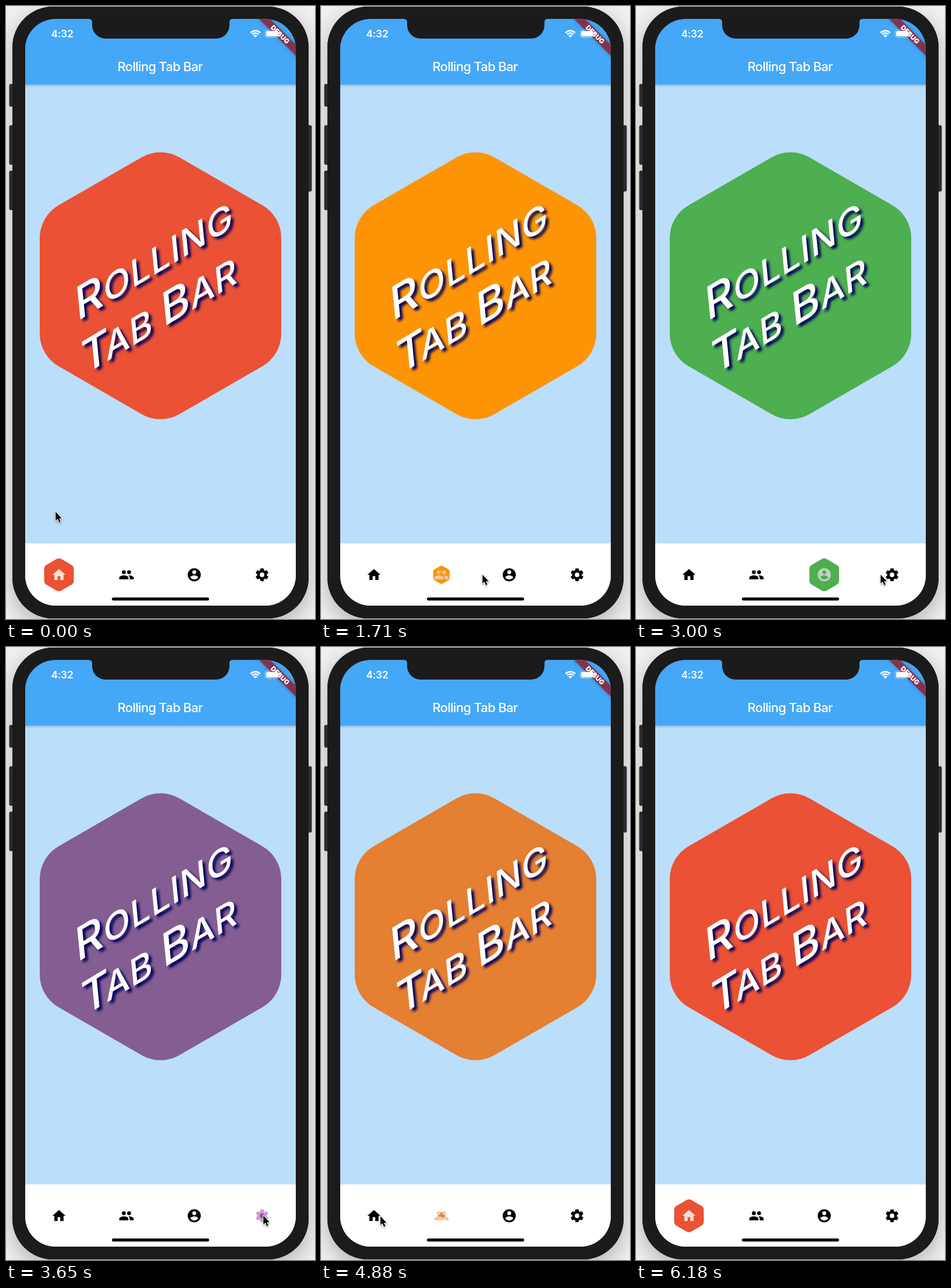
Write an HTML page with a canvas that moves like this. It is 531 by 1054 pixels and loops after 7880 ms.

```html
<!DOCTYPE html>
<html lang="en">
<head>
<meta charset="utf-8">
<title>Rolling Tab Bar</title>
<style>
html, body { margin: 0; width: 100%; height: 100%; overflow: hidden; background: #f1efef; }
canvas { display: block; }
</style>
</head>
<body>
<canvas id="stage" width="531" height="1054"></canvas>
<script>
const ctx = document.getElementById('stage').getContext('2d');
const LOOP = 7880;
const MORPH = 350;
const SANS = 'Inter, "Open Sans", sans-serif';
const TAB_Y = 978;
const ICON_SCALE = 1.123;

const tabs = [
  { x: 91, color: [235, 81, 52], active: '#fce0d0' },
  { x: 207, color: [254, 151, 4], active: '#f1c8a6' },
  { x: 323.5, color: [77, 175, 80], active: '#c6d0c8' },
  { x: 440, color: [157, 57, 177], active: '#cfa0d1' }
];

// Start of each colour change and the tab it leads to
const taps = [[0, 0], [1375, 1], [2575, 2], [3412, 3], [4622, 1], [5475, 0]];
const TAP_LEAD = 35; // the icon lights up this long before the morph

// Pointer path: time, x, y
const pointer = [
  [0, 85, 869], [150, 85, 869], [650, 106, 976], [790, 106, 976],
  [1120, 207, 976], [1450, 207, 976], [1710, 277, 977], [2000, 326, 974],
  [2210, 326, 974], [2350, 339, 982], [2700, 339, 982], [3000, 420, 977],
  [3180, 442, 977], [3700, 442, 977], [4000, 330, 1001], [4240, 188, 983],
  [4280, 185, 981], [4350, 205, 972], [4650, 205, 972], [4880, 102, 978],
  [5000, 83, 975], [6090, 83, 975], [6120, 76, 974], [6180, 76, 974]
];

const paths = {
  home: new Path2D('M10 20v-6h4v6h5v-8h3L12 3 2 12h3v8z'),
  people: new Path2D('M16 11a3 3 0 1 0 0-6a3 3 0 0 0 0 6zM8 11a3 3 0 1 0 0-6a3 3 0 0 0 0 6z' +
    'M8 13c-2.33 0-7 1.17-7 3.5V19h14v-2.5c0-2.33-4.67-3.5-7-3.5z' +
    'M16 13c-.29 0-.62.02-.97.05 1.16.84 1.97 1.97 1.97 3.45V19h6v-2.5c0-2.33-4.67-3.5-7-3.5z'),
  account: new Path2D('M12 2a10 10 0 1 0 0 20a10 10 0 0 0 0-20zM12 5a3 3 0 1 1 0 6a3 3 0 0 1 0-6z' +
    'M12 19.2c-2.5 0-4.71-1.28-6-3.22.03-1.99 4-3.08 6-3.08 1.99 0 5.97 1.09 6 3.08-1.29 1.94-3.5 3.22-6 3.22z'),
  gear: gearPath()
};
const icons = [paths.home, paths.people, paths.account, paths.gear];

const arrow = new Path2D('M0 0V15.2L3.4 12L6 18L8.5 16.9L6 11.2H10.6Z');

function gearPath() {
  const path = new Path2D();
  for (let i = 0; i < 6; i++) {
    const mid = -Math.PI / 2 + i * Math.PI / 3;
    for (const [turn, r] of [[-0.4, 7.4], [-0.23, 10.1], [0.23, 10.1], [0.4, 7.4]]) {
      path.lineTo(12 + r * Math.cos(mid + turn), 12 + r * Math.sin(mid + turn));
    }
  }
  path.closePath();
  path.moveTo(15.5, 12);
  path.arc(12, 12, 3.5, 0, Math.PI * 2);
  return path;
}

const lerp = (a, b, p) => a + (b - a) * p;
const rgb = c => `rgb(${c.map(Math.round).join(',')})`;

function box(x, y, w, h, r, fill) {
  ctx.beginPath();
  ctx.roundRect(x, y, w, h, r);
  ctx.fillStyle = fill;
  ctx.fill();
}

function label(text, x, y, font, spacing = 0) {
  ctx.font = `${font} ${SANS}`;
  ctx.letterSpacing = `${spacing}px`;
  ctx.textAlign = 'center';
  ctx.fillStyle = '#fff';
  ctx.fillText(text, x, y);
  ctx.letterSpacing = '0px';
}

function hexagon(x, y, width, fill) {
  if (width < 0.5) return;
  const half = width / 2;
  const radius = width / Math.sqrt(3);
  const corner = i => {
    const a = i * Math.PI / 3 - Math.PI / 2;
    return [x + radius * Math.cos(a), y + radius * Math.sin(a)];
  };
  ctx.beginPath();
  ctx.moveTo(x - half, y);
  for (const i of [5, 0, 1, 2, 3, 4]) {
    ctx.arcTo(...corner(i), ...corner(i + 1), width * 0.157);
  }
  ctx.closePath();
  ctx.fillStyle = fill;
  ctx.fill();
}

function tabState(t) {
  let i = taps.length - 1;
  while (i && taps[i][0] - TAP_LEAD > t) i--;
  const [start, to] = taps[i];
  const from = i ? taps[i - 1][1] : to;
  const p = i ? Math.min(1, Math.max(0, (t - start) / MORPH)) : 1;
  const color = tabs[from].color.map((c, k) => lerp(c, tabs[to].color[k], p));
  const grow = Math.max(0, 2 * p - 1);
  return {
    to,
    color: rgb(color),
    spot: p < 0.5 ? from : to,
    scale: p < 0.5 ? (1 - 2 * p) ** 2 : 0.5 * (grow + grow ** 20)
  };
}

function drawPhone() {
  ctx.fillStyle = '#f1efef';
  ctx.fillRect(0, 0, 531, 1054);
  ctx.save();
  ctx.shadowColor = 'rgba(0,0,0,.26)';
  ctx.shadowBlur = 36;
  ctx.shadowOffsetY = 12;
  box(11, 1, 509, 1052, 70, '#1b1b1b');
  ctx.restore();
  for (const [x, y, h] of [[5.5, 134, 39], [5.5, 205, 68], [5.5, 283, 68], [516, 205, 114]]) {
    box(x, y, 9.5, h, 3, '#292e35');
  }
  box(11, 1, 509, 1052, 70, '#1b1b1b');
}

function drawBanner() {
  ctx.save();
  ctx.translate(498, 22);
  ctx.rotate(Math.PI / 4);
  ctx.shadowColor = 'rgba(0,0,0,.35)';
  ctx.shadowBlur = 6;
  ctx.fillStyle = 'rgba(160,22,36,.72)';
  ctx.fillRect(-60, 31.4, 120, 13.5);
  ctx.shadowColor = 'transparent';
  label('DEBUG', 0, 42.2, '900 11.5px');
  ctx.restore();
}

function drawStatus() {
  label('4:32', 96.5, 54, '600 17.5px', -0.3);

  ctx.fillStyle = ctx.strokeStyle = '#fff';
  ctx.lineWidth = 2.6;
  for (const r of [11.8, 7.8]) {
    ctx.beginPath();
    ctx.arc(428.5, 54.3, r, -Math.PI * 0.75, -Math.PI * 0.25);
    ctx.stroke();
  }
  ctx.beginPath();
  ctx.moveTo(428.5, 54.5);
  ctx.arc(428.5, 54.3, 4.8, -Math.PI * 0.75, -Math.PI * 0.25);
  ctx.fill();

  ctx.lineWidth = 1;
  ctx.globalAlpha = 0.5;
  ctx.beginPath();
  ctx.roundRect(445.2, 41.2, 24.5, 12.8, 3.6);
  ctx.stroke();
  ctx.globalAlpha = 1;
  box(447, 43, 21, 9.2, 2, '#fff');
  box(470.7, 45.4, 1.6, 4.4, 0.8, 'rgba(255,255,255,.6)');
}

function drawNotch() {
  ctx.beginPath();
  ctx.moveTo(142, 21);
  ctx.lineTo(142, 22);
  ctx.quadraticCurveTo(148, 22, 148, 28);
  ctx.arcTo(148, 56, 172, 56, 23);
  ctx.arcTo(384, 56, 384, 30, 23);
  ctx.lineTo(384, 28);
  ctx.quadraticCurveTo(384, 22, 390, 22);
  ctx.lineTo(390, 21);
  ctx.fillStyle = '#1b1b1b';
  ctx.fill();
}

// Small capitals: runs of [text, size, kern], centred on a slanted baseline
function drawSlanted(runs, x, y, spacing) {
  const setFont = size => {
    ctx.font = `500 ${size}px ${SANS}`;
    ctx.letterSpacing = `${spacing}px`;
  };
  const widths = runs.map(([text, size, kern = 0]) => {
    setFont(size);
    return ctx.measureText(text).width + kern;
  });
  let pen = -widths.reduce((a, b) => a + b) / 2;
  ctx.save();
  ctx.transform(0.944, -0.57, 0.1, 1, x, y);
  ctx.textAlign = 'left';
  ctx.fillStyle = '#fff';
  ctx.shadowColor = '#00005a';
  ctx.shadowBlur = 4;
  ctx.shadowOffsetX = 5;
  ctx.shadowOffsetY = 4;
  runs.forEach(([text, size], i) => {
    setFont(size);
    ctx.fillText(text, pen, 0);
    pen += widths[i];
  });
  ctx.restore();
}

function drawScreen(t) {
  const state = tabState(t);
  ctx.save();
  ctx.beginPath();
  ctx.roundRect(33, 22.5, 465, 1008.5, 52);
  ctx.clip();

  ctx.fillStyle = '#bbdefb';
  ctx.fillRect(33, 22, 465, 1010);
  ctx.save();
  ctx.shadowColor = 'rgba(0,0,0,.28)';
  ctx.shadowBlur = 5;
  ctx.shadowOffsetY = 1;
  ctx.fillStyle = '#44a7f7';
  ctx.fillRect(28, 18, 475, 117);
  ctx.restore();
  label('Rolling Tab Bar', 264.7, 112, '500 22px', -0.7);

  hexagon(265.5, 481, 415, state.color);
  drawSlanted([['R', 77], ['OLLING', 62]], 257, 461, 1.2);
  drawSlanted([['T', 77, -9], ['AB ', 62], ['B', 77], ['AR', 62]], 266, 555, 0.7);

  ctx.fillStyle = '#fff';
  ctx.fillRect(33, 924, 465, 108);
  hexagon(tabs[state.spot].x, TAB_Y, 51 * state.scale, state.color);
  tabs.forEach((tab, i) => {
    ctx.save();
    ctx.translate(tab.x, TAB_Y);
    ctx.scale(ICON_SCALE, ICON_SCALE);
    ctx.translate(-12, -12);
    ctx.fillStyle = i === state.to ? tab.active : '#000';
    ctx.fill(icons[i], 'evenodd');
    ctx.restore();
  });
  box(182, 1017, 167, 5.2, 2.6, '#000');

  drawBanner();
  drawStatus();
  ctx.restore();
  drawNotch();
}

function drawPointer(t) {
  if (t >= 6180) return;
  const i = pointer.findIndex(k => k[0] > t);
  const [t0, x0, y0] = pointer[i - 1];
  const [t1, x1, y1] = pointer[i];
  const p = (t - t0) / (t1 - t0);
  ctx.save();
  ctx.translate(lerp(x0, x1, p) + 0.3, lerp(y0, y1, p) + 0.8);
  ctx.lineJoin = 'round';
  ctx.lineWidth = 2;
  ctx.strokeStyle = '#fff';
  ctx.shadowColor = 'rgba(0,0,0,.4)';
  ctx.shadowBlur = 3;
  ctx.shadowOffsetY = 1.5;
  ctx.stroke(arrow);
  ctx.shadowColor = 'transparent';
  ctx.fillStyle = '#000';
  ctx.fill(arrow);
  ctx.restore();
}

const begin = performance.now();

function frame() {
  const t = (performance.now() - begin) % LOOP;
  drawPhone();
  drawScreen(t);
  drawPointer(t);
  requestAnimationFrame(frame);
}
frame();
</script>
</body>
</html>
```
